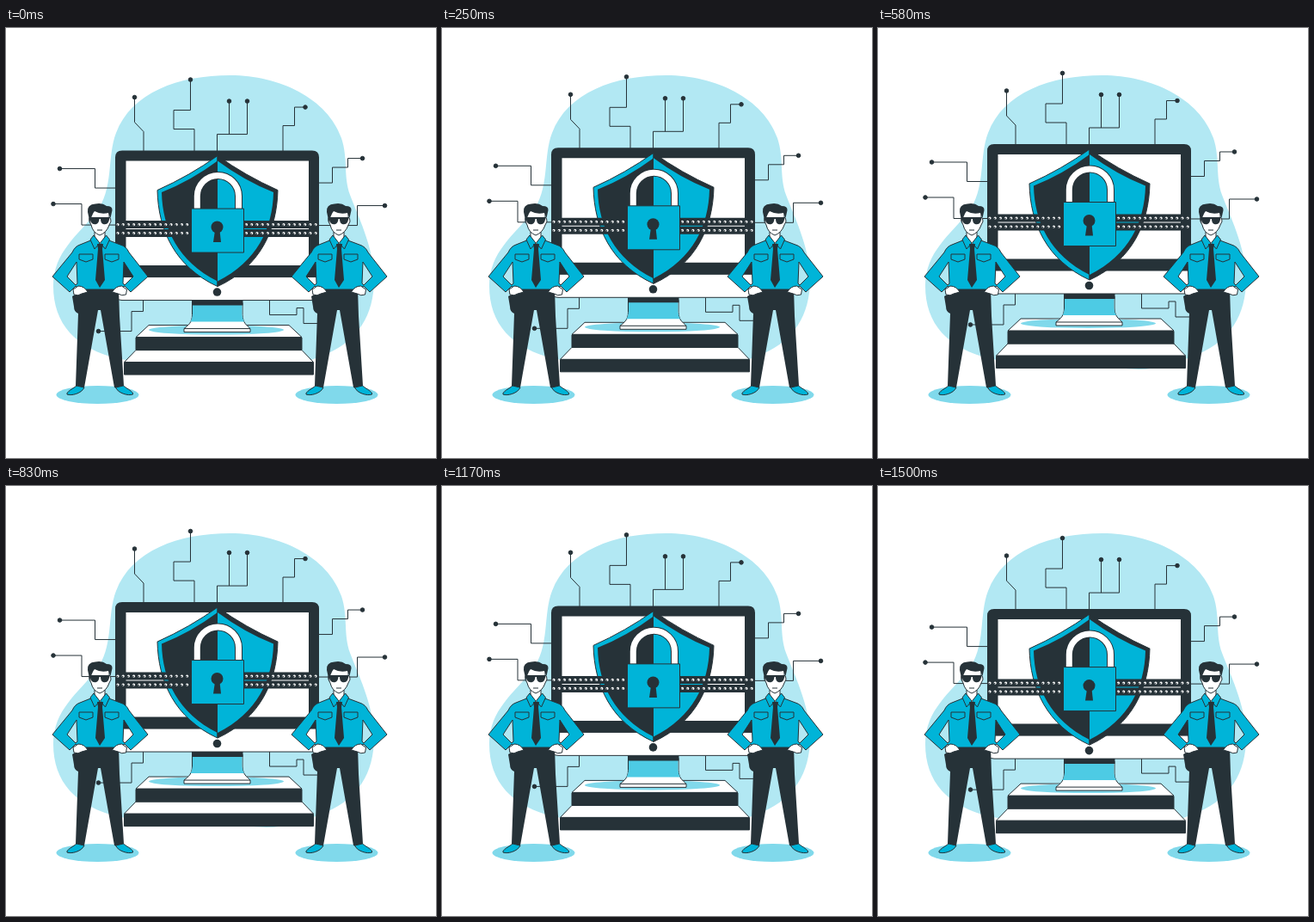
An HTML page that plays this animation: 500x500 px, repeating every 1540 ms.

```html
<!DOCTYPE html>
<html lang="en">
<head>
<meta charset="utf-8">
<title>Guarded computer</title>
<style>
  html, body { margin: 0; height: 100%; overflow: hidden; background: #fff; }
  svg { display: block; width: 100%; height: 100%; }
  .dark { fill: #263238; }
  .cyan { fill: #00b4d8; }
  .white { fill: #fff; }
  .shade { fill: #80d9eb; }
  .line { fill: none; }
  .ink { stroke: #263238; stroke-width: 1; stroke-linejoin: round; }
  .bead { fill: none; stroke-linecap: round; stroke-dasharray: 0 6.2; }
</style>
</head>
<body>
<svg viewBox="0 0 500 500">
  <defs>
    <g id="side">
      <path class="cyan ink" d="M82 416C77 420 70 423 71 426C76 428 88 425 91 418Z"/>
      <path class="white ink" d="M78 304L84 300Q91 300 95 307L88 309Q84 312 79 310Z"/>
      <path class="cyan ink" d="M102 241L109 250L103 257L98 246Z"/>
    </g>
    <g id="guard">
      <ellipse class="shade" cx="106.5" cy="426.5" rx="48" ry="10.5"/>
      <path class="dark" d="M82 303H131L132 335L137 416Q132 419 126 418L110 328H107L91 418Q86 419 81 416L84 332Q79 330 79 324L77 312L82 309Z"/>
      <path class="white ink" d="M103 232V246L109 252L115 246V232Z"/>
      <path class="cyan ink" fill-rule="evenodd" d="M101 246L86 252Q80 254 77 261L54 289L74 307L81 300L84 304H131L138 300L145 307L165 289L143 261Q140 254 133 252L117 246L109 252ZM82 272L71 289L81 299L83 297ZM137 272L148 289L138 299L136 297Z"/>
      <use href="#side"/>
      <use href="#side" transform="matrix(-1 0 0 1 218.5 0)"/>
      <path class="line ink" d="M85 263H101V269L93 272L85 269ZM115 263H131V269L123 272L115 269Z"/>
      <path class="dark" d="M106 251H113L112 257L115 293L109 302L104 293L107 257Z"/>
      <path class="white ink" d="M98 220Q96 220 97 225L99 229Q101 238 109 241Q117 238 120 229L122 225Q122 220 120 220V212H98Z"/>
      <path class="dark" d="M98 228L95 214Q94 205 104 204.500Q112 203 117 207Q124 207 123.500 212L121.500 221L119 215Q110 217 103 213Q99 217 98 228Z"/>
      <path class="dark" d="M97 220H121L119 226Q117 229 113 228Q110 227 110 222H108.500Q108 227 105 228Q101 229 99 226Z"/>
      <path class="line ink" d="M106 235H112"/>
    </g>
    <path id="half" d="M246 149Q214 172 176 189C177 235 196 278 246 301Z"/>
    <path id="inner" d="M246 155Q215 178 181 191.500C182 234 200 272 246 295Z"/>
  </defs>

  <path fill="#b2e8f3" d="M261 55C318 55 374 82 390 128C398 152 392 172 400 194C408 216 428 255 428 292C428 335 408 363 375 378C350 389 325 397 303 397C270 396 230 385 200 386C165 388 150 388 133 385C80 373 55 343 55 300C55 260 85 240 104 215C126 188 117 150 128 122C146 75 200 55 261 55Z"/>

  <g id="float">
    <g id="circuits" class="ink"></g>

    <path class="white ink" d="M151 375H344L357.500 389H137.500ZM166 346H329L344 360H151Z"/>
    <path class="dark ink" d="M137.500 389.500H357.500V403.500H137.500ZM151 360.500H344V375H151Z"/>
    <ellipse class="shade" cx="244.500" cy="351.500" rx="78.500" ry="5.500"/>
    <path class="white ink" d="M216.500 320H275V334C275 343 280 346 284 350V354H207V350C212 346 216.500 343 216.500 334ZM207 350H284"/>
    <path fill="#4dcbe4" d="M217 320H274.500V334Q275 339 277 342H214.500Q216.500 339 217 334Z"/>
    <path class="dark" d="M216 317H275.500V323H216Z"/>

    <path class="dark" d="M127 292V151Q127 143 135 143H356Q364 143 364 151V292Z"/>
    <path class="white" d="M139.500 155H352V276.500H139.500Z"/>
    <path class="white ink" d="M127.500 290H363.500V309Q363.500 317 356 317H135Q127.500 317 127.500 309Z"/>
    <circle class="dark" cx="245.500" cy="307.500" r="4.800"/>

    <use href="#half" class="cyan ink"/>
    <use href="#inner" class="dark"/>
    <g transform="matrix(-1 0 0 1 492 0)">
      <use href="#half" class="dark ink"/>
      <use href="#inner" class="cyan"/>
    </g>

    <g id="chains"></g>

    <g id="shackle" class="line"></g>
    <path class="cyan ink" d="M215.500 210.500H276.500V261.500H215.500Z"/>
    <path class="dark" d="M243 236H248.500L250 249.500H241Z"/>
    <circle class="dark" cx="245.500" cy="232" r="7"/>
  </g>

  <use href="#guard"/>
  <use href="#guard" x="278"/>
</svg>
<script>
  const byId = id => document.getElementById(id);

  // Each trace: node position, then the rest of the wire.
  const traces = [
    [214.5, 60.5, 'V96H195V118H219V145'],
    [149.5, 81, 'V110L160 121V145'],
    [259.5, 85.5, 'V124'],
    [280.5, 85.5, 'V124H245.5V150'],
    [348, 92.5, 'H335.5V114H322V145'],
    [62.5, 164, 'H103.5V186.5H128'],
    [55, 205, 'H88V229.5H128'],
    [414.5, 152, 'H397.5V162.5H379.5V180.5H363'],
    [440.5, 207, 'H408.5V230H363'],
    [107.5, 353, 'H146V330H159.5V317'],
    [376, 344, 'H346V326H338V334H306.5V317']
  ];
  byId('circuits').innerHTML = traces.map(([x, y, wire]) =>
    `<path class="line" d="M${x} ${y}${wire}"/><circle class="dark" cx="${x}" cy="${y}" r="2.3"/>`).join('');

  const beads = (x, y, color, width) =>
    `<path class="bead" stroke="${color}" stroke-width="${width}" d="M${x} ${y}h86M${x + 149.5} ${y}h86"/>`;
  byId('chains').innerHTML = [229, 239].map(y =>
    `<path stroke="#263238" stroke-width="9" d="M127 ${y}H364"/>` +
    beads(130, y, '#fff', 3.2) + beads(129.4, y + .6, '#263238', 1.6)).join('');

  byId('shackle').innerHTML = [['#263238', 9], ['#fff', 7]].map(([color, width]) =>
    `<path stroke="${color}" stroke-width="${width}" d="M222.3 211V196a24.1 24.1 0 0 1 48.2 0V211"/>`).join('');

  const LOOP = 1540, STEPS = 37, RISE = 10, LEAD = 65, BASE = .4;
  const float = byId('float');

  function draw(now) {
    const step = Math.floor((now % LOOP + 5) / LOOP * STEPS);
    const phase = (step / STEPS + LEAD / LOOP) % 1;
    const y = BASE - RISE * (1 - Math.abs(1 - 2 * phase));
    float.setAttribute('transform', `translate(0 ${y.toFixed(2)})`);
    requestAnimationFrame(draw);
  }
  draw(performance.now());
</script>
</body>
</html>
```
